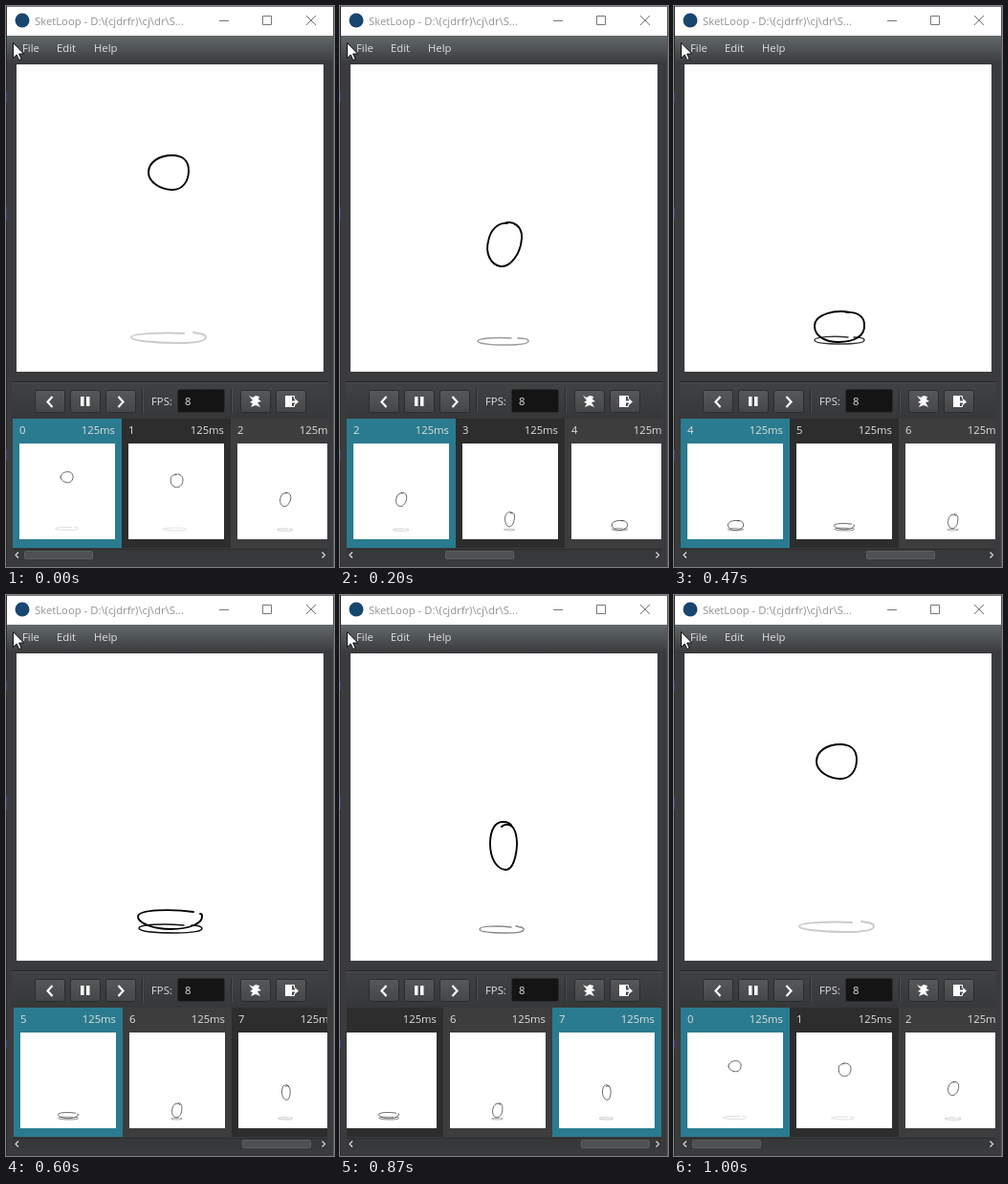
Recreate the animation shown at these times as an HTML page. Size 343 by 586 pixels, loop 1.07 s.

```html
<!DOCTYPE html>
<html lang="en">
<head>
<meta charset="utf-8">
<title>Bouncing ball</title>
<style>
  html, body { margin: 0; width: 100%; height: 100%; overflow: hidden; background: #3a3b3d; }
  svg { display: block; }
  text { font: 11.3px "Open Sans", "Noto Sans", sans-serif; fill: #e0e0e0; white-space: pre; }
  .ink { fill: none; stroke-linecap: round; stroke-linejoin: round; }
  .btn { fill: url(#btn); stroke: #2b2c2d; }
  .icon { fill: none; stroke: #fff; stroke-width: 2.2; }
  .sys { fill: none; stroke: #777; }
  .arrow { fill: none; stroke: #ddd; stroke-width: 1.2; }
</style>
</head>
<body>
<svg id="stage" width="343" height="586" viewBox="0 0 343 586">
  <defs id="defs">
    <linearGradient id="menu" x2="0" y2="1">
      <stop offset="0" stop-color="#626969"/><stop offset="1" stop-color="#38393b"/>
    </linearGradient>
    <linearGradient id="bar" x2="0" y2="1">
      <stop offset="0" stop-color="#414244"/><stop offset="1" stop-color="#363739"/>
    </linearGradient>
    <linearGradient id="btn" x2="0" y2="1">
      <stop offset="0" stop-color="#56585a"/><stop offset="1" stop-color="#444648"/>
    </linearGradient>
    <clipPath id="strip"><rect x="7" y="431" width="329" height="135"/></clipPath>
  </defs>

  <!-- window -->
  <rect width="343" height="586" fill="#3a3b3d"/>
  <rect y="31" width="343" height="30" fill="url(#menu)"/>
  <rect width="343" height="31" fill="#fff"/>
  <rect width="343" height="1" fill="#777"/>
  <rect width="1" height="586" fill="#2b2c2e"/>
  <rect x="342" width="1" height="586" fill="#55585a"/>
  <path d="M.5 90v10M.5 210v14M.5 464v10" stroke="#3a3f86"/>
  <circle cx="17" cy="15" r="7.5" fill="#17466f"/>
  <text x="30" y="20" style="fill:#929292">SketLoop - D:\(cjdrfr)\cj\dr\S...</text>
  <path class="sys" d="M223 15.5h10M268.500 10.500h9v9h-9zM314 10l10 10M324 10l-10 10"/>
  <text x="17" y="48">File</text>
  <text x="53" y="48">Edit</text>
  <text x="92" y="48">Help</text>
  <rect x="11" y="61" width="321" height="321" fill="#fff"/>
  <use id="view" x="11" y="61" width="321" height="321"/>

  <!-- controls -->
  <rect x="6" y="392" width="331" height="39" fill="url(#bar)"/>
  <path d="M6 392.500h331" stroke="#242526"/>
  <path d="M6 393.500h331" stroke="#4b4d4f"/>
  <g id="buttons"></g>
  <path class="icon" d="M48.500 408l-5 5.500 5 5.500M117.500 408l5 5.500-5 5.500"/>
  <path d="M78 408h3.500v10H78zM84 408h3.500v10H84z" fill="#fff"/>
  <path d="M142.500 400v25M235.500 400v25" stroke="#292a2b"/>
  <path d="M143.500 400v25M236.500 400v25" stroke="#4c4e50"/>
  <text x="152" y="417">FPS:</text>
  <rect x="179.500" y="400.500" width="49" height="24" rx="2" fill="#141414" stroke="#2a2b2c"/>
  <text x="187" y="417">8</text>
  <path d="M254 407l4 2 3-2 4 1-1 3 3 2-4 1 3 5-5-2-5 2 2-4-3-1 3-2z" fill="#fff"/>
  <path d="M292 407h7v12h-7z" fill="#fff"/>
  <path d="M299 407.500h2.500v3M301.500 416v2.500H299" fill="none" stroke="#fff"/>
  <path d="M299 412.500h3v-2.500l4 3.500-4 3.500v-2.500h-3z" fill="#fff"/>

  <!-- film strip -->
  <rect x="7" y="431" width="329" height="135" fill="#2d2d2d"/>
  <g clip-path="url(#strip)"><g id="cells"></g></g>
  <rect x="7" y="567" width="329" height="12" fill="#37383a"/>
  <path d="M7 567.500h329" stroke="#2b2c2d"/>
  <rect id="thumb" x="19.500" y="569.500" width="71" height="8" rx="1" fill="#4e5052" stroke="#5c5e60"/>
  <path class="arrow" d="M13 570.500l-3 3 3 3M330.500 570.500l3 3-3 3"/>
  <path d="M7.500 38.500v16l3.700-3.600 2.500 5.600 2.400-1-2.500-5.500h5z" fill="#fff" stroke="#000" stroke-width=".9"/>
</svg>
<script>
const LOOP = 1070;
const CELL = 114;

// ball outline, shadow outline, shadow colour
const poses = [
  ['M149 174C149 163 160 156 174 156C185 156 191 162 191 172C191 184 184 192 174 192C162 192 149 184 149 174',
   'M186 342C165 341 131 342 131 346C131 350 160 352 180 352C198 352 209 350 209 346C209 343 203 342 196 341', '#cbcbcb'],
  ['M168 164C178 162 194 166 194 182C194 198 185 207 174 208C161 208 153 198 153 184C152 172 159 165 171 166',
   'M184 344C165 343 128 344 128 348C128 351 160 353 178 353C194 353 204 351 204 348C204 345 199 344 192 344', '#bababa'],
  ['M172 227C180 224 191 229 190 243C189 259 178 273 168 272C157 270 152 258 155 246C157 234 165 226 175 227',
   'M179 347C163 346 144 347 144 350C144 353 160 354 174 354C188 354 197 353 197 350C197 348 192 347 186 347', '#9a9a9a'],
  ['M173 294C180 292 186 296 186 303C187 318 180 340 169 340C159 340 154 325 154 312C154 300 161 291 170 291C174 291 177 292 178 293',
   'M178 348C165 347 150 348 150 350C150 352 161 353 170 353C180 353 187 352 187 350C187 349 184 348 180 348', '#777'],
  ['M184 320C168 317 147 322 147 334C147 345 158 351 172 351C188 351 200 345 199 333C199 324 191 319 180 320',
   'M182 346C165 344 147 346 147 349C147 352 160 353 174 353C189 353 199 352 199 349C199 347 194 346 188 346', '#333'],
  ['M196 331C175 328 138 328 138 336C138 343 155 349 172 349C192 349 206 343 205 335C205 334 204 333 203 333',
   'M186 345C165 343 139 344 139 348C140 352 160 353 178 353C195 353 206 351 205 348C204 346 200 345 194 345', '#111'],
  ['M176 298C185 297 188 306 187 319C186 336 178 346 169 346C159 346 154 336 154 325C155 310 161 299 172 299C176 299 179 300 180 303',
   'M176 348C165 347 151 348 151 350C151 352 162 353 172 353C182 353 189 352 189 350C189 349 186 348 181 348', '#555'],
  ['M169 242C172 239 178 239 181 243C185 249 186 260 184 270C182 281 179 287 173 287C163 286 157 274 157 260C157 246 162 237 170 237C175 237 179 239 180 242',
   'M179 347C165 345 146 346 146 349C146 352 160 353 174 353C185 353 193 352 192 349C192 347 189 347 184 346', '#888']
];

// start time, pose, strip scroll
const steps = [
  [0, 0, 0], [130, 1, 114], [200, 2, 228], [400, 3, 342], [470, 4, 456],
  [600, 5, 569], [730, 6, 583], [870, 7, 583], [1000, 0, 0]
];

const $ = id => document.getElementById(id);

function add(parent, tag, attrs, text) {
  const el = document.createElementNS('http://www.w3.org/2000/svg', tag);
  for (const key in attrs) el.setAttribute(key, attrs[key]);
  if (text !== undefined) el.textContent = text;
  parent.append(el);
  return el;
}

for (const x of [30, 67, 104, 245, 282]) {
  add($('buttons'), 'rect', { class: 'btn', x: x + .5, y: 401.5, width: 31, height: 23, rx: 2 });
}

const backs = poses.map(([ball, shadow, shade], i) => {
  const art = add($('defs'), 'symbol', { id: 'pose' + i, viewBox: '11 61 321 321' });
  add(art, 'path', { class: 'ink', d: shadow, stroke: shade, 'stroke-width': i === 0 ? 2 : 1.5 });
  add(art, 'path', { class: 'ink', d: ball, stroke: '#000', 'stroke-width': 1.9 });

  const x = 7 + i * CELL;
  const back = add($('cells'), 'rect', { x, y: 431, width: CELL, height: 135 });
  add($('cells'), 'text', { x: x + 7, y: 447 }, i);
  add($('cells'), 'text', { x: x + 107, y: 447, 'text-anchor': 'end' }, '125ms');
  add($('cells'), 'rect', { x: x + 7, y: 457, width: 100, height: 100, fill: '#fff' });
  add($('cells'), 'use', { href: '#pose' + i, x: x + 7, y: 457, width: 100, height: 100 });
  return back;
});

let shown = null;

function draw(now) {
  const t = now % LOOP;
  const step = steps.findLast(s => s[0] <= t);
  if (step !== shown) {
    shown = step;
    const [, pose, scroll] = step;
    $('view').setAttribute('href', '#pose' + pose);
    $('cells').setAttribute('transform', `translate(${-scroll} 0)`);
    $('thumb').setAttribute('x', Math.round(19 + scroll * .4) + .5);
    backs.forEach((b, i) => b.setAttribute('fill', i === pose ? '#2a7b8f' : i % 2 ? '#2d2d2d' : '#3d3d3d'));
  }
}

const start = performance.now();
function tick() {
  draw(performance.now() - start);
  requestAnimationFrame(tick);
}
tick();
</script>
</body>
</html>
```
